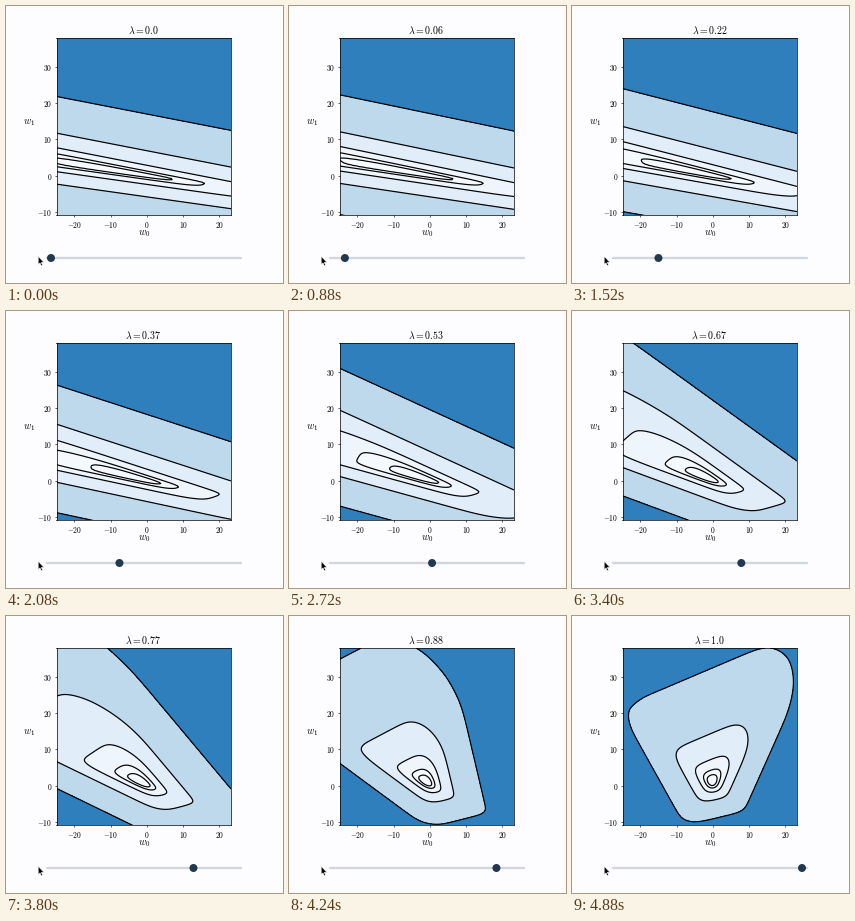
These frames come from a looping animation (277 px wide and 277 px high, 4.92 s). A matplotlib script:

```python
import numpy as np
import matplotlib.pyplot as plt
from matplotlib.animation import FuncAnimation
from matplotlib.patches import Circle, Polygon

SIZE, DPI = 277, 100
STEP_MS, LOOP_MS = 40, 4920
PX = 72 / DPI  # points per pixel
PAPER = "#fdfcfe"

plt.rcParams["mathtext.fontset"] = "cm"

# One-dimensional, two-class data with overlapping clusters
low_neg = np.linspace(-1.08, -0.32, 11)
high_neg = np.linspace(0.8, 1.1, 2)
low_pos = np.linspace(-1.0, -0.4, 4)
high_pos = np.linspace(1.05, 1.5, 7)
scaled = np.concatenate([low_neg, high_neg, low_pos, high_pos])
raw = 6 + 1.95 * scaled
sign = np.repeat([1, -1], [13, 11])

XLIM, YLIM = (-24.9, 23.2), (-11, 38)
W0, W1 = np.meshgrid(np.linspace(*XLIM, 150), np.linspace(*YLIM, 150))

# Slider drag: time in ms against lambda
DRAG_T = [0, 560, 600, 860, 1160, 1520, 2080, 2720, 3400, 4240, 4520, 4880]
DRAG_L = [0, .02, .02, .055, .115, .224, .37, .53, .672, .878, .962, 1]


def loss_at(lam):
    """Mean logistic loss while the feature blends from raw to standardised."""
    feature = (1 - lam) * raw + lam * scaled
    total = np.zeros_like(W0)
    for x, s in zip(feature, sign):
        total += np.logaddexp(0, s * (W0 + W1 * x))
    return total / len(raw)


def levels_for(loss):
    lo, hi = loss.min(), loss.max()
    rings = lo + (hi - lo) * 0.397 ** np.arange(5, 0, -1)
    return [lo - 1e-6, *rings, hi + 1e-6]


fig = plt.figure(figsize=(SIZE / DPI, SIZE / DPI), dpi=DPI, facecolor=PAPER)

# Full-stage layer in pixel coordinates, y pointing down
stage = fig.add_axes([0, 0, 1, 1])
stage.set_xlim(0, SIZE)
stage.set_ylim(SIZE, 0)
stage.axis("off")

ax = fig.add_axes([50.5 / SIZE, 1 - 209.4 / SIZE, 174.5 / SIZE, 177.4 / SIZE])
ax.set_xlim(*XLIM)
ax.set_ylim(*YLIM)
xticks, yticks = range(-20, 21, 10), range(-10, 31, 10)
ax.set_xticks(xticks, [f"${v}$" for v in xticks])
ax.set_yticks(yticks, [f"${v}$" for v in yticks])
ax.tick_params(length=2.3 * PX, width=0.6 * PX, pad=2 * PX, labelsize=7.6 * PX)
for spine in ax.spines.values():
    spine.set_linewidth(0.7 * PX)


def label(x, y, text):
    return stage.text(x, y, text, fontsize=9.9 * PX, ha="center", va="baseline")


title = label(137.5, 28, "")
label(138, 229, "$w_0$")
label(23, 118, "$w_1$")

stage.plot([41, 235], [252, 252], color="#d0d7df", lw=2.3 * PX,
           solid_capstyle="round")
knob = Circle((45, 252), 4, facecolor="#22384f", edgecolor="none", zorder=3)
stage.add_patch(knob)

arrow = np.array([(0, 0), (0, 8.2), (1.8, 6.5), (3, 9.4), (4.3, 8.8),
                  (3.1, 6.1), (5.6, 6)])
stage.add_patch(Polygon(arrow + (32.2, 250.3), facecolor="black",
                        edgecolor="white", lw=0.5 * PX, zorder=4))

drawn = []


def draw(i):
    lam = np.interp(i * STEP_MS, DRAG_T, DRAG_L)
    while drawn:
        drawn.pop().remove()
    loss = loss_at(lam)
    levels = levels_for(loss)
    drawn.append(ax.contourf(W0, W1, loss, levels, cmap="Blues"))
    drawn.append(ax.contour(W0, W1, loss, levels[1:-1], colors="black",
                            linewidths=1.2 * PX))
    title.set_text(rf"$\lambda = {round(float(lam), 2)}$")
    knob.center = (45 + 185 * lam, 252)
    return []


anim = FuncAnimation(fig, draw, frames=LOOP_MS // STEP_MS, interval=STEP_MS,
                     repeat=True, repeat_delay=0, blit=False)
plt.show()
```
